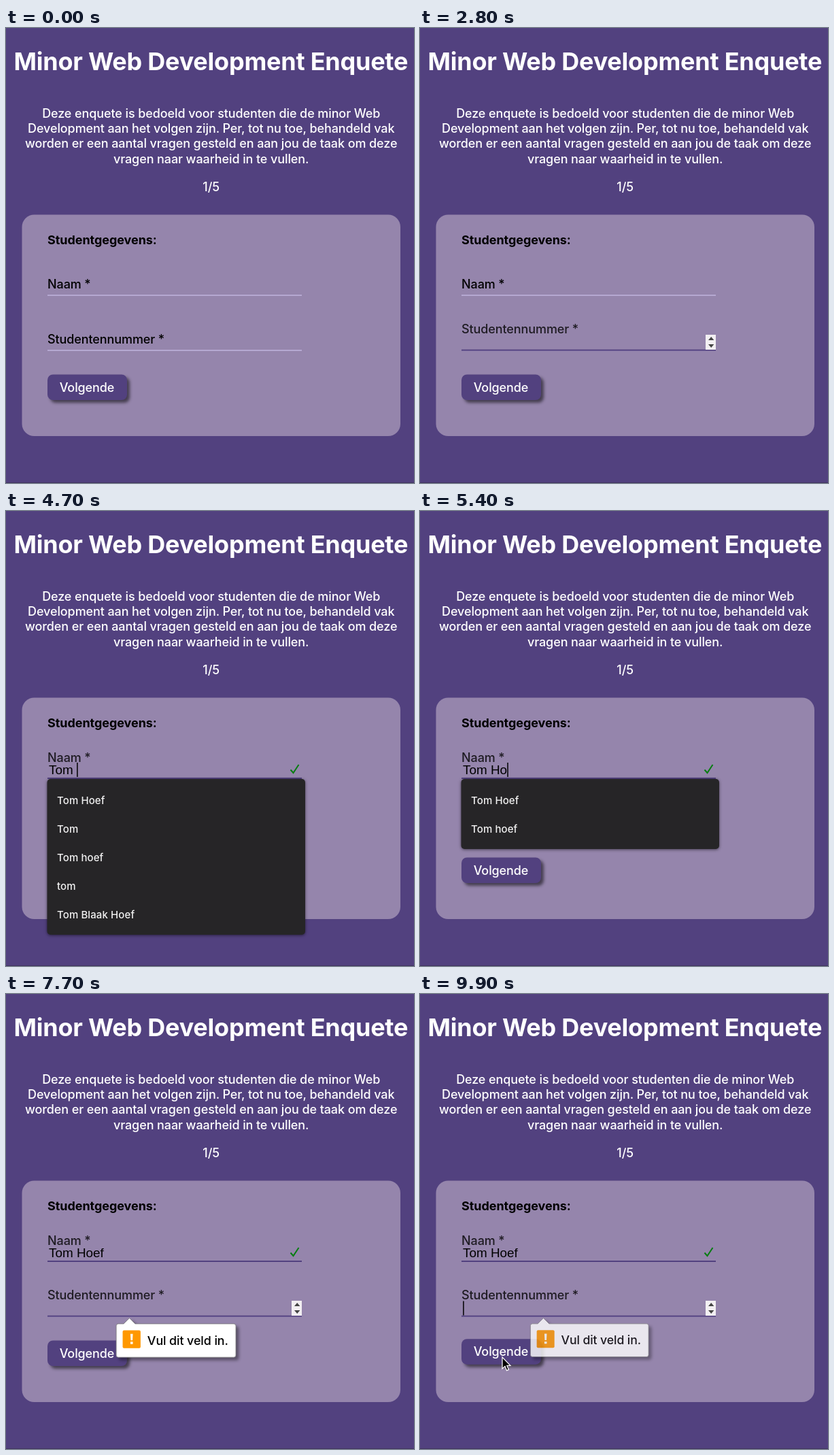
An HTML page for the animation above (10 s loop, 600 by 669 pixels).

```html
<!DOCTYPE html>
<html lang="nl">
<head>
<meta charset="utf-8">
<title>Minor Web Development Enquete</title>
<style>
  html, body { margin: 0; width: 100%; height: 100%; overflow: hidden; background: #52417f; }
  svg { display: block; width: 100%; height: 100%; }
  text { font: 450 18px Inter, Roboto, sans-serif; font-optical-sizing: none; letter-spacing: -.1px; white-space: pre; }
  .title { font-size: 36px; font-weight: 700; letter-spacing: -.23px; }
  .center { text-anchor: middle; fill: #fff; }
  .legend { font-weight: 700; letter-spacing: -.05px; }
  .typed { font: 18.9px "Liberation Sans", Arial, sans-serif; letter-spacing: 0; }
  .menu text { font-size: 15px; font-weight: 500; letter-spacing: .1px; fill: #f2f2f2; }
  .menu rect { filter: drop-shadow(0 1px 2px #0008); }
  .button rect { filter: drop-shadow(4px 4px 2px #0008); }
  .bubble .frame { filter: drop-shadow(4px 4px 2px #0006); }
</style>
</head>
<body>
<svg viewBox="0 0 600 669" preserveAspectRatio="none">
  <rect width="600" height="669" fill="#52417f"/>
  <rect y="668" width="600" height="1" fill="#41345f"/>
  <text class="center title" x="301.3" y="62">Minor Web Development Enquete</text>
  <text class="center" x="301.7" y="132">Deze enquete is bedoeld voor studenten die de minor Web</text>
  <text class="center" x="301.7" y="154">Development aan het volgen zijn. Per, tot nu toe, behandeld vak</text>
  <text class="center" x="301.7" y="176.3">worden er een aantal vragen gesteld en aan jou de taak om deze</text>
  <text class="center" x="301.7" y="198.5">vragen naar waarheid in te vullen.</text>
  <text class="center" x="301.7" y="239.5">1/5</text>

  <rect x="23.5" y="274.5" width="556.5" height="325.5" rx="18" fill="#9585ac"/>
  <text class="legend" x="61" y="318">Studentgegevens:</text>

  <g id="name">
    <text class="label" x="61" y="383">Naam *</text>
    <rect class="line" x="61" y="392" width="374" height="2" fill="#b5a8d1"/>
    <rect class="line active" x="61" y="392" width="374" height="2" fill="#52417f"/>
  </g>
  <text id="typed" class="typed" x="63" y="387"></text>
  <path id="check" d="M418.5 380.5l4 4.5 8-12" fill="none" stroke="#087d12" stroke-width="2"/>

  <g id="number">
    <text class="label" x="61" y="463.5">Studentennummer *</text>
    <rect class="line" x="61" y="473" width="374" height="2" fill="#b5a8d1"/>
    <rect class="line active" x="61" y="472.7" width="374" height="2" fill="#52417f"/>
  </g>
  <g id="spinner">
    <rect x="420" y="451" width="15" height="22" fill="#f2eff2"/>
    <path d="M424 459l4.2-5 4.2 5zM424 465l4.2 5 4.2-5z" fill="#444"/>
  </g>
  <rect id="caret" width="1.5" height="21"/>

  <g id="button" class="button">
    <rect x="61" y="509.5" width="117" height="37.5" rx="8" fill="#52417f"/>
    <text class="center" x="119" y="534.5">Volgende</text>
  </g>

  <g id="menu" class="menu">
    <rect x="60.5" y="394" width="379.5" rx="5" fill="#262527"/>
    <g id="rows"></g>
  </g>

  <g id="bubble" class="bubble">
    <path class="frame" d="M165 485h8l8.5-8.5 8.5 8.5h146a3 3 0 0 1 3 3v43.5a3 3 0 0 1-3 3H165a3 3 0 0 1-3-3V488a3 3 0 0 1 3-3z" fill="#fff" stroke="#777" stroke-width=".8"/>
    <rect x="171.5" y="494.5" width="26.5" height="26.5" rx="2" fill="#ff9800"/>
    <path d="M183 500h3.6l-.5 9.5h-2.6zM183 511.5h3.6v3.5h-3.6z" fill="#fff"/>
    <text x="208" y="516">Vul dit veld in.</text>
  </g>

  <path id="pointer" d="M0 0V17L4 13.3L6.5 19.6L9.4 18.4L6.8 12.3H12Z" fill="#000" stroke="#fff" stroke-width="1.2"/>
</svg>
<script>
const LOOP = 10000, STEP = 100, BLINK = 500;
const $ = id => document.getElementById(id);
const show = (el, on) => el.setAttribute('visibility', on ? 'visible' : 'hidden');
const clamp = v => Math.max(0, Math.min(1, v));
const smooth = v => v * v * (3 - 2 * v);
const lerp = (a, b, p) => a + (b - a) * p;
const ctx = document.createElement('canvas').getContext('2d');

const NAMES = ['Tom Hoef', 'Tom', 'Tom hoef', 'tom', 'Tom Blaak Hoef', 'Test', 'test'];
const typing = [[0, ''], [4200, 'T'], [4500, 'To'], [4600, 'Tom'], [4700, 'Tom '],
  [5000, 'Tom H'], [5400, 'Tom Ho'], [5500, 'Tom Hoe'], [5600, 'Tom Hoef']];
const menus = [[0, []], [4200, NAMES], [4600, NAMES.slice(0, 5)],
  [4800, [NAMES[0], NAMES[2], NAMES[4]]], [5100, [NAMES[0], NAMES[2]]], [7100, []]];
const focus = [[0, ''], [1200, 'name'], [2300, 'number'], [3200, 'name'], [7200, 'number']];
const caretResets = [...focus, ...typing, [9800]].map(([at]) => at);
const pointerPath = [[8200, 328, 615], [8700, 262, 572], [9100, 226, 546], [9300, 205, 551], [9700, 121, 534]];

const current = (track, t) => track.filter(([at]) => at <= t).pop()[1];

// Alternates between up and down at each given time.
function raised(times, t) {
  return times.reduce((level, at, i) => {
    const p = smooth(clamp((t - at) / 300));
    return lerp(level, i % 2 ? 0 : 1, p);
  }, 0);
}

function drawField(id, level) {
  const label = $(id).querySelector('.label');
  label.setAttribute('transform', `translate(0 ${-14.2 * level})`);
  label.setAttribute('fill-opacity', 1 - .2 * level);
  $(id).querySelector('.active').setAttribute('opacity', level);
}

function drawCaret(t, field, text) {
  const since = t - Math.max(...caretResets.filter(at => at <= t));
  show($('caret'), field && Math.floor(since / BLINK) % 2 === 0);
  ctx.font = '18.9px "Liberation Sans", Arial, sans-serif';
  const offset = field === 'name' ? ctx.measureText(text).width : 0;
  $('caret').setAttribute('x', 63.2 + offset);
  $('caret').setAttribute('y', field === 'name' ? 370 : 451.5);
}

function drawMenu(items) {
  show($('menu'), items.length);
  $('menu').querySelector('rect').setAttribute('height', 19 + 42 * items.length);
  $('rows').innerHTML = items.map((item, i) =>
    `<text x="75" y="${430.5 + 42 * i}">${item}</text>`).join('');
}

function drawBubble(t) {
  const enter = 1 - (1 - clamp((t - 7400) / 600)) ** 3;
  const leave = clamp((t - 9800) / 500);
  const scale = .95 + .05 * enter - .09 * leave;
  show($('bubble'), enter > 0);
  $('bubble').setAttribute('opacity', clamp(enter * 1.2) - leave);
  $('bubble').setAttribute('transform', `translate(181 477) scale(${scale}) translate(-181 -477)`);
}

function drawPointer(t) {
  const next = pointerPath.findIndex(([at]) => at > t);
  const to = pointerPath.at(next);
  const from = next > 0 ? pointerPath[next - 1] : to;
  const p = from === to ? 1 : (t - from[0]) / (to[0] - from[0]);
  show($('pointer'), t >= pointerPath[0][0]);
  $('pointer').setAttribute('transform', `translate(${lerp(from[1], to[1], p)} ${lerp(from[2], to[2], p)})`);
}

function draw(t) {
  const text = current(typing, t), field = current(focus, t);
  drawField('name', raised([1150, 2250, 3150], t));
  drawField('number', raised([2250, 3150, 7150], t));
  $('typed').textContent = text;
  show($('check'), text);
  show($('spinner'), field === 'number');
  drawCaret(t, field, text);
  drawMenu(current(menus, t));
  drawBubble(t);
  drawPointer(t);
  $('button').setAttribute('transform', `translate(0 ${-2.3 * smooth(clamp((t - 9550) / 200))})`);
}

let last = -1;
function tick() {
  const t = Math.floor(performance.now() % LOOP / STEP) * STEP;
  if (t !== last) draw(last = t);
  requestAnimationFrame(tick);
}
tick();
</script>
</body>
</html>
```
